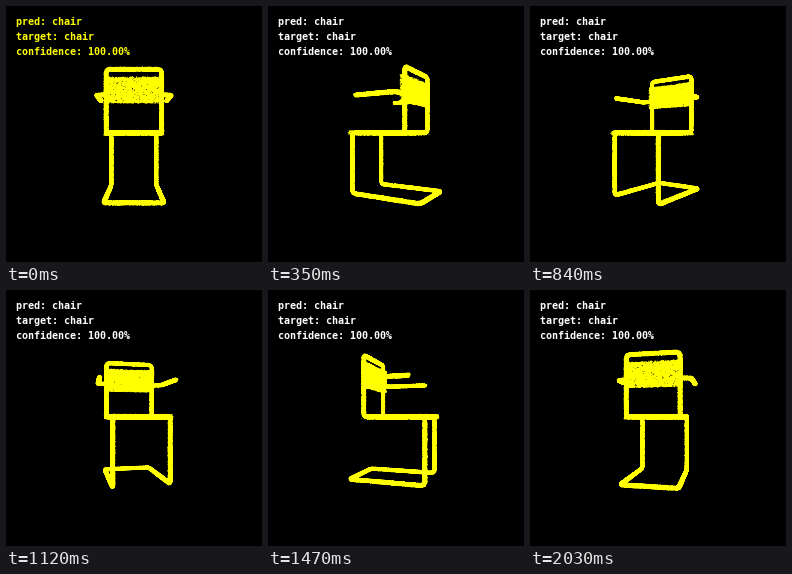
Write a matplotlib script that moves like this. It is 256 by 256 pixels and loops after 2.1 s.

```python
import numpy as np
import matplotlib.pyplot as plt
from matplotlib.animation import FuncAnimation

SIZE, DPI = 256, 100
FRAMES, INTERVAL = 30, 70
FOCAL, DIST = 248, 4.245      # pinhole camera at seat height
CX, CY = 127.4, 126.3
GAIN = 0.6                    # brightness of a single point

rng = np.random.default_rng(7)


def rounded(points, radius, closed=False):
    """Replace the corners of a polyline with short quadratic curves."""
    pts = np.array(points, float)
    n = len(pts)
    t = np.linspace(0, 1, 8)[:, None]
    out = []
    for i, p in enumerate(pts):
        if not closed and i in (0, n - 1):
            out.append(p[None])
            continue
        a, b = pts[i - 1] - p, pts[(i + 1) % n] - p
        a = p + a / np.linalg.norm(a) * radius
        b = p + b / np.linalg.norm(b) * radius
        out.append((1 - t) ** 2 * a + 2 * t * (1 - t) * p + t ** 2 * b)
    if closed:
        out.append(out[0][:1])
    return np.vstack(out)


def tube(path, count, radius=0.031):
    """Random points on the skin of a tube that follows the path."""
    steps = np.linalg.norm(np.diff(path, axis=0), axis=1)
    dist = np.r_[0, np.cumsum(steps)]
    s = rng.uniform(0, dist[-1], count)
    centre = np.column_stack([np.interp(s, dist, path[:, k]) for k in range(3)])
    normal = rng.normal(size=(count, 3))
    return centre + radius * normal / np.linalg.norm(normal, axis=1)[:, None]


def box(low, high, count):
    return rng.uniform(low, high, (count, 3))


def make_chair():
    """Axes: sideways, up, backwards; the floor lies near -1."""
    half = [(0.4375, -1.015, 0.65), (0.4375, -1.015, -0.59),
            (0.4375, 0, -0.59), (0.43, 0, 0.4), (0.43, 0.985, 0.4)]
    mirror = [(-x, y, z) for x, y, z in reversed(half)]
    parts = [tube(rounded(half + mirror, 0.07, closed=True), 20000)]
    for side in (-1, 1):
        arm = [(side * 0.43, 0.595, 0.36), (side * 0.59, 0.595, 0.32),
               (side * 0.61, 0.595, -0.39)]
        parts.append(tube(rounded(arm, 0.04), 2200))
    parts.append(box((-0.47, -0.038, -0.67), (0.47, 0.038, 0.42), 5000))
    parts.append(box((-0.46, 0.465, 0.33), (0.46, 0.87, 0.41), 4700))
    return np.vstack(parts)


def render(cloud, angle):
    """Project the turned cloud and splat it into a yellow image."""
    x, y, z = cloud.T
    c, s = np.cos(angle), np.sin(angle)
    scale = FOCAL / (DIST - (z * c - x * s))
    px = CX + (x * c + z * s) * scale
    py = CY - y * scale
    ix, iy = np.floor(px).astype(int), np.floor(py).astype(int)
    fx, fy = px - ix, py - iy
    light = np.zeros((SIZE, SIZE))
    for dx, wx in ((0, 1 - fx), (1, fx)):
        for dy, wy in ((0, 1 - fy), (1, fy)):
            np.add.at(light, (iy + dy, ix + dx), GAIN * wx * wy)
    image = np.zeros((SIZE, SIZE, 3))
    image[..., :2] = np.clip(light, 0, 1)[..., None]
    return image


chair = make_chair()

fig = plt.figure(figsize=(SIZE / DPI, SIZE / DPI), dpi=DPI, facecolor="black")
ax = fig.add_axes([0, 0, 1, 1])
picture = ax.imshow(render(chair, 0), extent=(0, SIZE, SIZE, 0),
                    interpolation="nearest", aspect="auto")
ax.set(xlim=(0, SIZE), ylim=(SIZE, 0))
ax.axis("off")

lines = ["pred: chair", "target: chair", "confidence: 100.00%"]
labels = [ax.text(9.5, 19 + 15 * i, line, family="DejaVu Sans Mono",
                  weight="bold", size=10 * 72 / DPI, color="yellow",
                  va="baseline", ha="left")
          for i, line in enumerate(lines)]


def update(i):
    picture.set_data(render(chair, 2 * np.pi * i / FRAMES))
    for label in labels:
        label.set_color("yellow" if i == 0 else "white")
    return [picture, *labels]


anim = FuncAnimation(fig, update, frames=FRAMES, interval=INTERVAL,
                     repeat=True, repeat_delay=0, blit=False)
plt.show()
```
